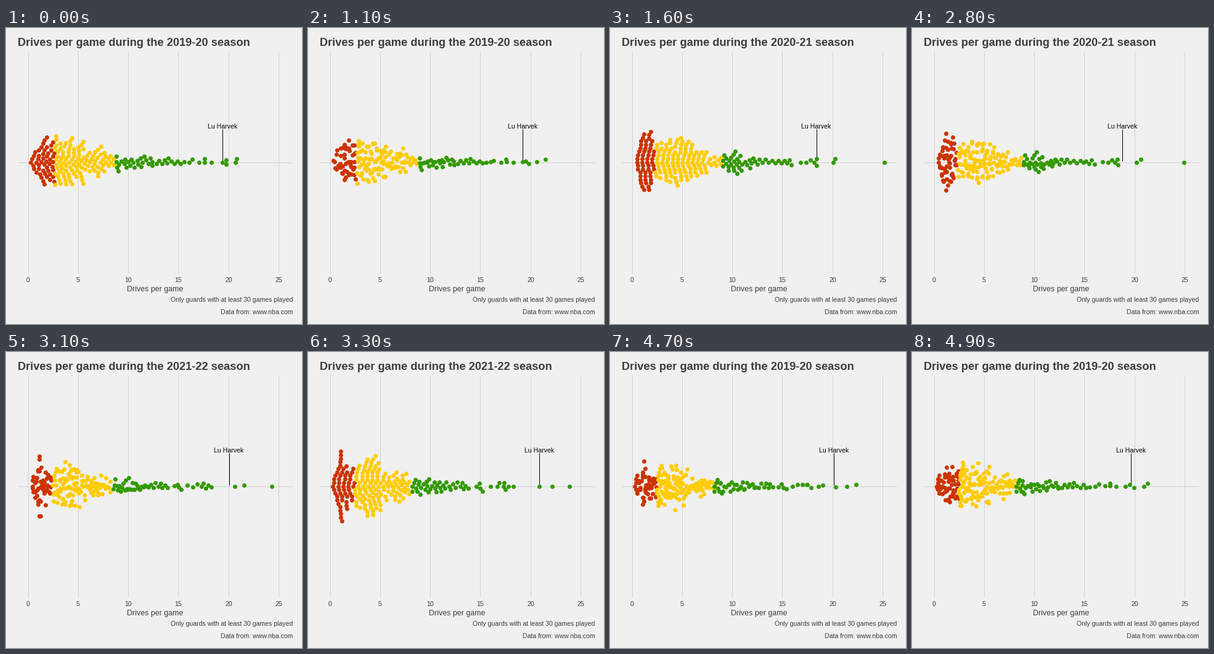
A matplotlib script for the animation above (5000 ms loop, 480 by 480 pixels).

```python
import numpy as np
import matplotlib.pyplot as plt
from matplotlib.animation import FuncAnimation

plt.rcParams["font.family"] = "Liberation Sans"

SIZE, DPI = 480, 80
PT = 72 / DPI                      # points per pixel
BG, GRID, INK = "#F0F0F0", "#D2D2D2", "#3C3C3C"
COLORS = np.array(["#CC3300", "#FFCC00", "#339900"])
MID = 218                          # swarm axis
GAP_X, GAP_Y = 7.6, 5.8            # room each dot takes in the swarm
STEPS = 6                          # steps per move between seasons
STARTS, RESTS = (0, 16, 33), (11, 12, 12)
PLAYER = "Lu Harvek"

# knots: value of every tenth player, then the leaders one by one
SEASONS = [
    dict(name="2019-20", cuts=(2.65, 8.65), player=19.4,
         knots=[.3, 1.1, 1.5, 1.9, 2.35, 2.7, 3.0, 3.45, 3.85, 4.25, 4.7,
                5.2, 5.6, 6.5, 7.1, 7.9, 9.2, 10.8, 12.5, 15.2],
         leaders=[15.6, 16.1, 16.4, 17.1, 17.6, 17.6, 18.3, 19.4, 19.8, 19.8,
                  20.7, 20.8]),
    dict(name="2020-21", cuts=(2.25, 9.05), player=18.4,
         knots=[.5, .9, 1.15, 1.5, 1.75, 2.1, 2.55, 3.1, 3.55, 3.95, 4.4,
                4.75, 5.15, 5.6, 6.1, 6.7, 7.5, 9.1, 10.0, 10.8, 12.4, 15.5],
         leaders=[15.7, 15.9, 16.8, 17.4, 17.8, 18.2, 18.4, 18.4, 20.1, 20.3,
                  25.2]),
    dict(name="2021-22", cuts=(2.42, 7.95), player=20.9,
         knots=[.3, .85, 1.05, 1.25, 1.7, 2.2, 2.7, 3.1, 3.5, 3.75, 4.1,
                4.35, 4.65, 5.0, 5.7, 6.4, 7.0, 7.6, 8.8, 10.1, 11.4, 13.6],
         leaders=[13.8, 14.6, 14.9, 15.0, 15.2, 16.0, 16.7, 16.9, 17.3, 17.4,
                  17.5, 17.8, 18.3, 20.9, 22.2, 23.9]),
]

rng = np.random.default_rng(7)


def px(value):
    return 36 + 16.25 * value


def players(knots, leaders):
    """Values in ascending order, rounded to one decimal."""
    rank = np.linspace(0, len(knots) - 1, 10 * (len(knots) - 1) + 1)
    x = np.interp(rank, np.arange(len(knots)), knots)
    x[1:] += rng.uniform(-.08, .08, len(x) - 1)
    return np.sort(np.round(np.append(x, leaders), 1))


def swarm(x):
    """Offset of each dot: the free spot nearest to the axis."""
    y = np.zeros(len(x))
    for i in range(len(x)):
        near = np.flatnonzero(x[i] - x[:i] < GAP_X)
        dx, yn = x[i] - x[near], y[near]
        reach = GAP_Y * np.sqrt(1 - (dx / GAP_X) ** 2)
        spots = np.concatenate([[0], yn - reach, yn + reach])
        free = [s for s in spots if np.all(np.abs(s - yn) > reach - 1e-6)]
        y[i] = min(free, key=lambda s: (round(abs(s), 6), s))
    return y


def groups(season):
    """Dot positions per colour, highest value first, ties in random order."""
    v = players(season["knots"], season["leaders"])
    dots = np.column_stack([px(v), MID + swarm(px(v))])
    order = np.lexsort((rng.random(len(v)), -v))
    color = np.digitize(v, season["cuts"])[order]
    return [dots[order][color == c] for c in range(3)]


def move(a, b, t):
    """Pair dots by rank; those without a partner wait where they are."""
    out = a.copy()
    n = min(len(a), len(b))
    out[:n] += (b[:n] - a[:n]) * t
    return out


swarms = [groups(s) for s in SEASONS]

fig = plt.figure(figsize=(SIZE / DPI, SIZE / DPI), dpi=DPI, facecolor=BG)
ax = fig.add_axes([0, 0, 1, 1])
ax.set(xlim=(0, SIZE), ylim=(SIZE, 0))
ax.axis("off")


def text(x, y, s, size, **kw):
    kw = {"color": INK, "ha": "center", "va": "baseline", **kw}
    return ax.text(x, y, s, fontsize=size * PT, **kw)


def line(x, y, color, z):
    return ax.plot(x, y, color=color, lw=PT, zorder=z,
                   solid_capstyle="butt")[0]


for v in range(0, 26, 5):
    x = int(px(v))
    line([x, x], [38, 398], GRID, 1)
    text(x, 412, str(v), 10.6)
line([19, 465], [MID, MID], GRID, 1)

title = text(19, 29, "", 18.28, ha="left", weight="bold")
text(241.5, 427, "Drives per game", 12.4)
text(465, 443.5, "Only guards with at least 30 games played", 10.5, ha="right")
text(465, 464.5, "Data from: www.nba.com", 10.5, ha="right")

pointer = line([], [], "black", 2)
label = text(0, 163, PLAYER, 10.5, color="black")
dots = ax.scatter([], [], s=(7 * PT) ** 2, linewidths=0, zorder=3)


def phase(frame):
    """Season index and step of its move (0 while at rest)."""
    i = sum(frame >= s for s in STARTS) - 1
    return i, max(0, frame - STARTS[i] - RESTS[i] + 1)


def draw(frame):
    i, step = phase(frame)
    j = (i + 1) % len(SEASONS)
    t = step / STEPS
    if step:
        parts = [move(a, b, t) for a, b in zip(swarms[i], swarms[j])]
    else:
        parts = swarms[i]
    dots.set_offsets(np.floor(np.vstack(parts)) + 0.5)
    dots.set_facecolors(np.repeat(COLORS, [len(p) for p in parts]))

    shown = SEASONS[j if t >= 0.5 else i]["name"]
    title.set_text(f"Drives per game during the {shown} season")
    a, b = px(SEASONS[i]["player"]), px(SEASONS[j]["player"])
    x = a + (b - a) * t
    label.set_x(x - 0.5)
    pointer.set_data([np.floor(x)] * 2, [164, 216])
    return dots, title, label, pointer


anim = FuncAnimation(fig, draw, frames=50, interval=100, repeat=True,
                     repeat_delay=0, blit=False)
plt.show()
```
